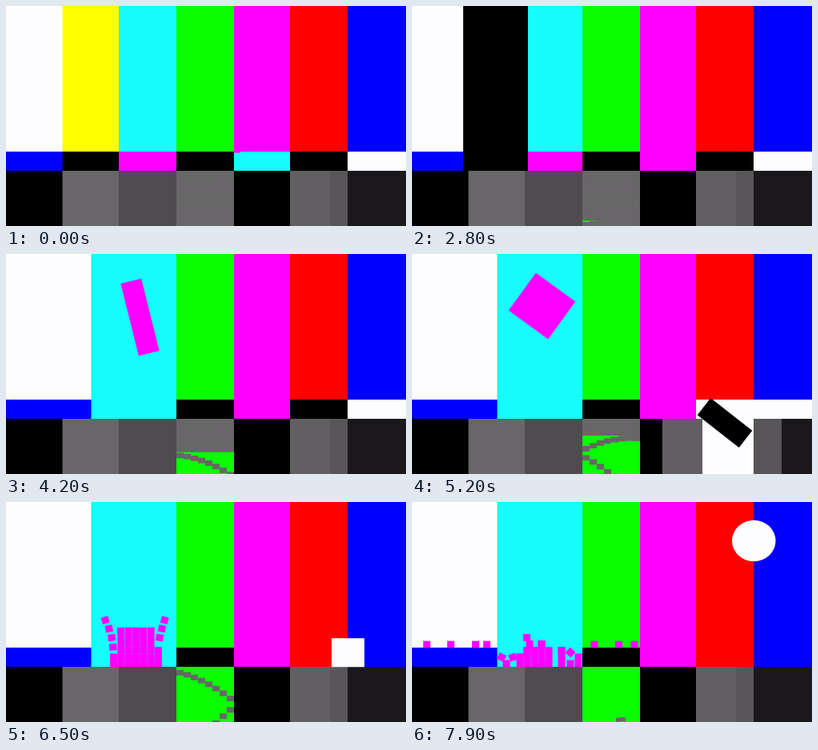
Write an HTML page with a canvas that moves like this. It is 500 px wide and 275 px high and loops after 8000 ms.

```html
<!DOCTYPE html>
<html lang="en">
<head>
<meta charset="utf-8">
<title>Colour bars</title>
<style>
html, body { margin: 0; width: 100%; height: 100%; overflow: hidden; background: #000; }
canvas { display: block; width: 100vw; height: 100vh; }
</style>
</head>
<body>
<canvas id="stage" width="500" height="275"></canvas>
<script>
const g = document.getElementById('stage').getContext('2d');
const LOOP = 8, STEP = 0.1;
const WHITE = '#fdfcff', YELLOW = '#ffff02', CYAN = '#16fdfd', GREEN = '#09ff00';
const MAGENTA = '#ff00ff', RED = '#ff0000', BLUE = '#0000ff', BLACK = '#000';
const GREY = '#686668', DIM = '#4e4c4f', DOOR = '#625f62', STRIP = '#585658', DARK = '#1a181b';

const clamp = v => Math.max(0, Math.min(1, v));
const mix = (a, b, p) => a + (b - a) * p;
const linear = p => p;
const easeIn = p => p * p;
const easeOut = p => 1 - (1 - p) ** 2;
const smooth = p => p * p * (3 - 2 * p);

// Rows are [time, values, ease into this row].
function track(t, rows) {
  if (t <= rows[0][0]) return rows[0][1];
  for (let i = 1; i < rows.length; i++) {
    const [t1, v1, ease = smooth] = rows[i];
    if (t < t1) {
      const [t0, v0] = rows[i - 1];
      const p = ease((t - t0) / (t1 - t0));
      return v0.map((v, k) => mix(v, v1[k], p));
    }
  }
  return rows[rows.length - 1][1];
}

// Filled box given by its left, top, right and bottom edges.
function box(color, l, t, r, b) {
  g.fillStyle = color;
  g.fillRect(l, t, r - l, b - t);
}

function turned(color, x, y, w, h, deg) {
  g.save();
  g.translate(x, y);
  g.rotate(deg * Math.PI / 180);
  box(color, -w / 2, -h / 2, w / 2, h / 2);
  g.restore();
}

function clipped(l, t, r, b, draw) {
  g.save();
  g.beginPath();
  g.rect(l, t, r - l, b - t);
  g.clip();
  draw();
  g.restore();
}

const GAP = [
  [2.2, [70.5, 141]], [2.6, [62, 147], easeOut], [2.8, [64, 145]],
  [3.4, [93, 118], easeIn], [3.6, [106.5, 106.5], easeOut]
];
const RISE = [[1.3, [182]], [1.8, [164]], [2.4, [0], easeIn]];

function leftBars(t) {
  const [l, r] = track(t, GAP);
  box(YELLOW, 70, 0, 141, 182);
  if (t < 3.6) box(BLACK, l, track(t, RISE)[0], r, 206);
  box(WHITE, 0, 0, l, 182);
  box(BLUE, 0, 182, l, 206);
  box(CYAN, r, 0, 213, 206);
  if (t < 3.55) box(MAGENTA, r, 182, 213, 206);
}

const POUR = [
  [0, [285, 206, 0]], [0.3, [287, 204, 1.5]], [1.2, [302, 190.5, 1.6]],
  [2.2, [344, 183, 1]], [2.4, [356, 181, 0]]
];

function liquid(t) {
  if (t >= 2.4) return;
  const [left, level, wave] = track(t, POUR.map(([a, b]) => [a, b, linear]));
  clipped(285, 182, 355, 206, () => {
    g.fillStyle = CYAN;
    g.beginPath();
    g.moveTo(left, 182);
    if (t > 0) g.quadraticCurveTo(left - 2, level, left + 8, level + 1);
    else g.lineTo(left, level);
    for (let x = left + 9; x <= 357; x += 2) {
      const sag = wave * 2.2 * clamp((x - 338) / 9);
      g.lineTo(x, level + wave * Math.sin((x - 285) / 7 + (t - 1.2) * 5) + sag - wave * 0.5);
    }
    g.lineTo(357, level);
    g.lineTo(357, 182);
    g.fill();
    g.fillStyle = MAGENTA;
    if (t < 0.3) g.fillRect(285, 182, 8 + t * 30, 1.5 + t * 10);
    if (t > 0.6) {
      for (const [x, y, r] of [[353, 188, 1.6], [344, 190.5, 1.3], [339, 186, 0.8]]) {
        g.beginPath();
        g.arc(x, y + (1.2 - t) * 5, r, 0, 7);
        g.fill();
      }
    }
  });
}

// Bricks drop one by one, row by row from below, turning back at each end.
const COLS = 8, ROWS = 10, BW = 9, BH = 6.9;

function bricks(t) {
  box(GREEN, 213, 206, 285, 275);
  clipped(213, 206, 285, 275, () => {
    for (let i = 0; i < COLS * ROWS; i++) {
      const row = Math.floor(i / COLS);
      const col = row % 2 ? COLS - 1 - i % COLS : i % COLS;
      const age = Math.max(0, t - 2.69 - i * 0.0462);
      const x = 213 + col * BW, y = 275 - (row + 1) * BH + 155 * age * age;
      const solid = age ? 0 : 0.3;
      if (y < 275) box(GREY, x, y - solid, x + BW + solid, y + BH + solid);
    }
    if (t > 7.65) {
      const y = mix(279, 272, easeOut(clamp((t - 7.65) / 0.25)));
      turned(GREY, 259, y, 8, 5, -8);
      turned(GREY, 264, y - 0.3, 6, 5, 10);
    }
  });
}

// Centre, width, height, angle.
const SLAB_POS = [
  [3.5, [159.5, 194]], [4.2, [167.5, 79], easeOut], [4.7, [165, 67], easeOut],
  [5.2, [162.5, 65]], [5.4, [162.5, 67], easeIn], [6.2, [162.5, 181.5], easeIn]
];
const SLAB_SHAPE = [
  [3.5, [107, 24, 0]], [4.2, [93, 26.5, 76], linear],
  [5.2, [61, 58, 216], linear], [6.1, [60, 60, 360], linear], [6.25, [65, 49.2, 360]]
];

const PW = 9.25, PH = 8.2;
const LEDGES = { 0: [18.5, 48.5, 79.5, 93.5], 6: [278, 258.5, 228] };
const STACKS = [
  [112, 0], [118, 1], [126, 0], [135, 2], [144, 3], [153, 3],
  [162, 4], [171, 3], [187, 3], [198, 1], [208, 2]
];
const LOOSE = [[112, 194, 25], [126, 194, -20], [143.5, 169.5, 0], [147, 177.5, 0], [198, 188, 40]];

const heap = [...LOOSE];
for (const [x, n] of STACKS)
  for (let k = 0; k < n; k++) heap.push([x, 202 - k * PH, 0]);
heap.sort((a, b) => a[0] - b[0] || a[1] - b[1]);

const pieces = [];
for (let c = 0; c < 7; c++) {
  for (let r = 0; r < 6; r++) {
    const start = [162.5 + (c - 3) * PW, 206 - (5.5 - r) * PH];
    const ledge = (LEDGES[c] || [])[r];
    pieces.push(ledge
      ? { start, end: [ledge, 178, 0], delay: r * 0.025, span: 1.1, hop: 45, spin: c ? 180 : -180 }
      : { start, delay: r * 0.02, span: 0.75, hop: 6, spin: 0 });
  }
}
const inner = pieces.filter(p => !p.end);
inner.forEach((p, i) => { p.end = heap[Math.floor(i * heap.length / inner.length)]; });

function slab(t) {
  if (t < 3.55) return;
  if (t < 6.35) {
    const [x, y] = track(t, SLAB_POS);
    const [w, h, a] = track(t, SLAB_SHAPE);
    turned(MAGENTA, x, y, w, h, a);
    return;
  }
  for (const { start, end, delay, span, hop, spin } of pieces) {
    const p = clamp((t - 6.4 - delay) / span);
    const q = spin ? p : easeIn(p);
    const x = mix(start[0], end[0], q);
    const y = mix(start[1], end[1], q) - hop * 4 * q * (1 - q);
    turned(MAGENTA, x, y, mix(9.4, 9, clamp(p * 12)), mix(8.5, 8.7, p), q * (end[2] + spin));
  }
}

// Gap left, gap right, dark edge.
const HATCH = [
  [4.3, [405, 405, 427]], [5, [363, 427, 462]], [5.6, [363, 427, 462]], [6.1, [405, 405, 427]]
];
const PLANK = [
  [4.5, [391, 194, 72, 24, 0]], [5.2, [391, 211, 66, 27, 38], easeIn],
  [5.7, [391, 330, 66, 27, 85], easeIn]
];
// Centre y, width, height, corner roundness.
const LIGHT = [
  [5.4, [194, 145, 24, 0]], [6.15, [190, 54, 32, 0]], [6.5, [188.3, 41, 36, 0]],
  [6.65, [170, 44, 44, 0.3], easeIn], [7, [56, 56, 56, 1], easeOut],
  [7.3, [50, 57, 56, 1], easeOut], [7.6, [48.5, 54.5, 51.5, 1]]
];

function light(t) {
  const [y, w, h, round] = track(t, LIGHT);
  g.fillStyle = WHITE;
  g.beginPath();
  if (round === 1) g.ellipse(427.3, y, w / 2, h / 2, 0, 0, 7);
  else g.roundRect(427.5 - w / 2, y - h / 2, w, h, round * Math.min(w, h) / 2);
  g.fill();
}

function rightBars(t) {
  const [l, r, dark] = track(t, HATCH);
  box(RED, 355, 0, 427.5, 206);
  box(BLUE, 427.5, 0, 500, 206);
  box(BLACK, 285, 206, 355, 275);
  box(DOOR, l - 50, 206, l, 275);
  box(WHITE, l, 206, r, 275);
  box(STRIP, r, 206, dark, 275);
  box(DARK, dark, 206, 500, 275);
  light(t);
  if (t < 5.7) clipped(355, 181, 427.5, 275, () => turned(BLACK, ...track(t, PLANK)));
}

function draw(t) {
  box(BLACK, 0, 0, 500, 275);
  leftBars(t);
  box(GREEN, 213, 0, 285, 182);
  box(BLACK, 213, 182, 285, 206);
  box(MAGENTA, 285, 0, 355, 206);
  liquid(t);
  rightBars(t);
  box(BLACK, 0, 206, 70.5, 275);
  box(GREY, 70.5, 206, 141, 275);
  box(DIM, 141, 206, 213, 275);
  bricks(t);
  slab(t);
}

const begin = performance.now();
function tick() {
  const t = Math.max(0, performance.now() - begin) / 1000 % LOOP;
  draw(Math.floor(t / STEP + 1e-6) * STEP);
  requestAnimationFrame(tick);
}
tick();
</script>
</body>
</html>
```
